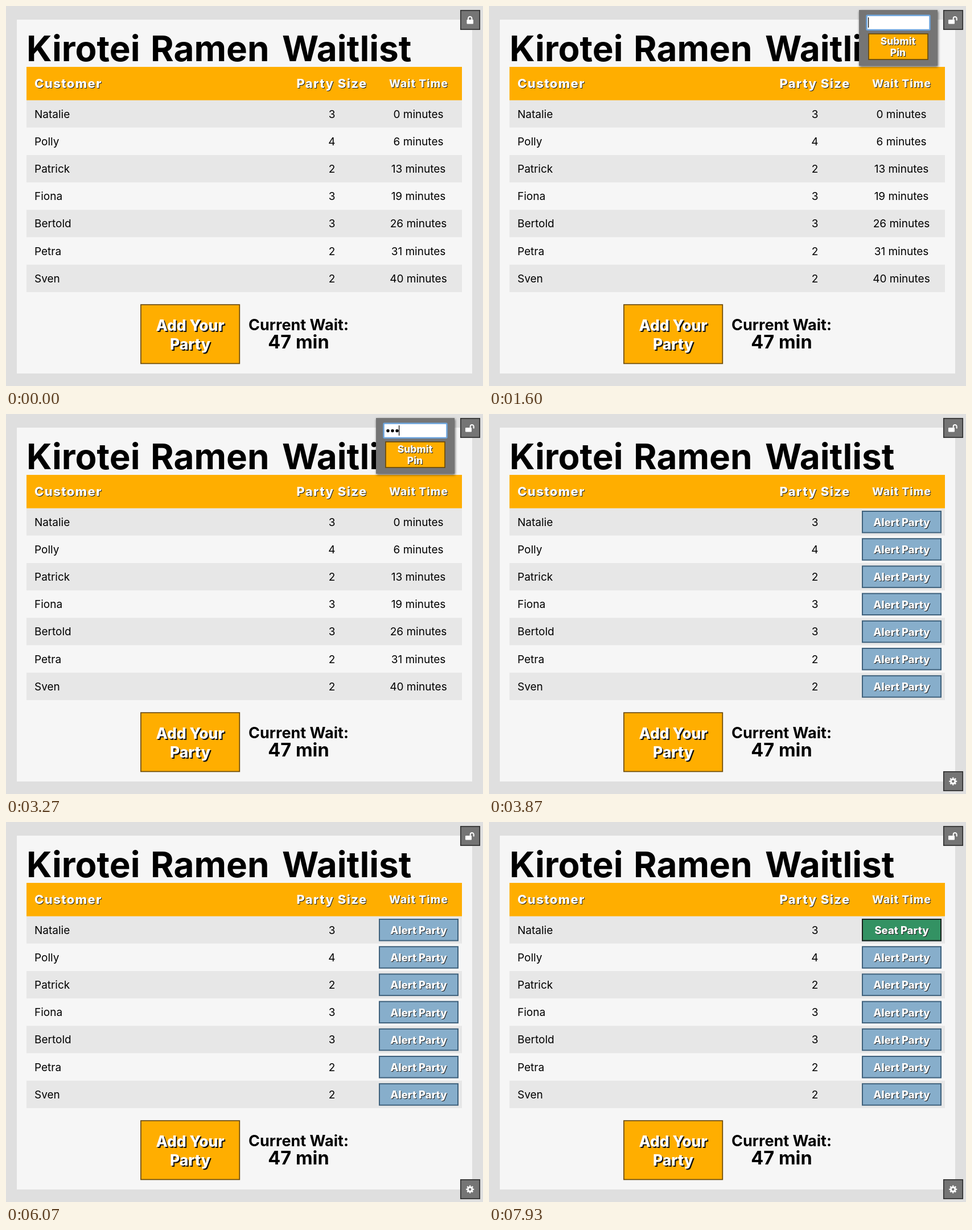
Recreate the animation shown at these times as an HTML page. Size 838 by 668 pixels, loop 8 s.

```html
<!DOCTYPE html>
<html lang="en">
<head>
<meta charset="utf-8">
<title>Waitlist</title>
<style>
  html, body { margin: 0; width: 100%; height: 100%; overflow: hidden; background: #dfdfdf; }
  svg { display: block; width: 838px; height: 668px; }
  text { font: 400 19px Inter, "Open Sans", sans-serif; font-optical-sizing: none; fill: #000; }
  .mid { text-anchor: middle; }
  .title { font-size: 62px; font-weight: 700; }
  .head { font-size: 22px; font-weight: 800; letter-spacing: 1.4px; fill: #fff; filter: drop-shadow(1px 1px 0 #222); }
  .head.small { font-size: 19px; letter-spacing: 1.1px; }
  .label { font-size: 18.5px; font-weight: 800; fill: #fff; filter: drop-shadow(1px 1px 0 #222); }
  .add { font-size: 26.5px; filter: drop-shadow(2px 2px 0 #111); }
  .submit { font-size: 17.5px; }
  .wait { font-size: 27px; font-weight: 700; }
  .wait.big { font-size: 32.5px; }

  .orange { fill: #ffae00; stroke: #6b4a08; stroke-width: 1.7; }
  .alert { fill: #87aecb; stroke: #3f617c; stroke-width: 2; }
  .seat { fill: #339263; stroke: #17231c; stroke-width: 2; }
  .tool { fill: #757575; stroke: #303030; stroke-width: 1.7; }
  .line { fill: none; stroke: #fff; }
  .white { fill: #fff; }

  .locked, .open, .pin, .staff, .seated { animation: 8s step-end infinite; }
  .locked { animation-name: locked; }
  .open { animation-name: open; }
  .pin { animation-name: pin; }
  .staff { animation-name: staff; }
  .seated { animation-name: seated; }
  .dots { animation: typing 8s step-end infinite; }
  .caret { animation: caret 8s step-end infinite, blink 1s .25s step-end infinite; }

  @keyframes locked { 0% { visibility: visible } 15.5% { visibility: hidden } }
  @keyframes open { 0% { visibility: hidden } 15.5% { visibility: visible } }
  @keyframes pin { 0%, 46.25% { visibility: hidden } 15.5% { visibility: visible } }
  @keyframes staff { 0% { visibility: hidden } 46.25% { visibility: visible } }
  @keyframes seated { 0% { visibility: hidden } 81.25% { visibility: visible } }
  @keyframes typing {
    0% { clip-path: inset(0 100% 0 0) }
    33.75% { clip-path: inset(0 75% 0 0) }
    36.25% { clip-path: inset(0 50% 0 0) }
    38.75% { clip-path: inset(0 25% 0 0) }
    41.25% { clip-path: inset(0) }
  }
  @keyframes caret {
    0% { transform: none }
    33.75% { transform: translateX(8px) }
    36.25% { transform: translateX(16px) }
    38.75% { transform: translateX(24px) }
    41.25% { transform: translateX(32px) }
  }
  @keyframes blink { 0% { opacity: 1 } 50% { opacity: 0 } }
</style>
</head>
<body>
<svg viewBox="0 0 838 668">
  <rect width="838" height="668" fill="#dfdfdf"/>
  <rect x="19" y="24" width="800" height="622" fill="#f6f6f6"/>

  <text class="title" y="97"><tspan x="36">Kirotei</tspan> <tspan x="254">Ramen</tspan> <tspan x="485">Waitlist</tspan></text>

  <g id="rows"></g>
  <rect x="36" y="107" width="765" height="58.7" fill="#ffae00"/>
  <text class="head" x="50" y="144">Customer</text>
  <text class="head mid" x="572.5" y="144">Party Size</text>
  <text class="head small mid" x="725" y="143">Wait Time</text>

  <rect class="orange" x="236.9" y="525.1" width="173.4" height="103.4"/>
  <text class="label add mid" x="323.5" y="571">Add Your</text>
  <text class="label add mid" x="323.5" y="604">Party</text>
  <text class="wait mid" x="514" y="570">Current Wait:</text>
  <text class="wait big mid" x="514" y="602">47 min</text>

  <g class="staff" id="buttons"></g>
  <g class="seated">
    <rect class="seat" x="656" y="171" width="138" height="37.5"/>
    <text class="label mid" x="725" y="197">Seat Party</text>
  </g>

  <rect class="tool" x="798.8" y="7.8" width="33.4" height="33.4"/>
  <g class="locked">
    <rect class="white" x="809.5" y="24" width="11.5" height="7.5" rx="1"/>
    <path class="line" stroke-width="2" d="M812 25v-3a3.2 3.2 0 0 1 6.4 0v3"/>
  </g>
  <g class="open">
    <rect class="white" x="807" y="24" width="11" height="7.5" rx="1"/>
    <path class="line" stroke-width="2" d="M815.7 25v-3a3 3 0 0 1 6 0v3.5"/>
  </g>

  <g class="staff">
    <rect class="tool" x="798.8" y="628.8" width="33.4" height="33.4"/>
    <circle class="line" cx="815.2" cy="645.7" r="3.8" stroke-width="3"/>
    <circle class="line" cx="815.2" cy="645.7" r="5.9" stroke-width="2.2" pathLength="16" stroke-dasharray="1" stroke-dashoffset=".5"/>
  </g>

  <g class="pin">
    <rect x="650" y="7" width="138" height="98" fill="#757575" style="filter: drop-shadow(1px 2px 2px #0009)"/>
    <rect x="663.5" y="16.5" width="111" height="25.5" rx="1.5" fill="#fff" stroke="#6da4dc" stroke-width="2.5"/>
    <g class="dots" fill="#000">
      <rect x="667" y="20" width="32" height="18" fill="none"/>
      <circle cx="671" cy="29.5" r="2.7"/>
      <circle cx="679" cy="29.5" r="2.7"/>
      <circle cx="687" cy="29.5" r="2.7"/>
      <circle cx="695" cy="29.5" r="2.7"/>
    </g>
    <rect class="caret" x="666" y="20" width="1.2" height="18"/>
    <rect class="orange" x="667" y="49" width="104" height="45"/>
    <text class="label submit mid" x="718.5" y="68">Submit</text>
    <text class="label submit mid" x="718.5" y="88">Pin</text>
  </g>
</svg>
<script>
  const parties = [
    ["Natalie", 3, 0], ["Polly", 4, 6], ["Patrick", 2, 13], ["Fiona", 3, 19],
    ["Bertold", 3, 26], ["Petra", 2, 31], ["Sven", 2, 40]
  ];
  const rowTop = 165.6, rowHeight = 48.2;

  const fill = (id, draw) => {
    document.getElementById(id).innerHTML =
      parties.map((party, i) => draw(rowTop + i * rowHeight, i, ...party)).join("");
  };

  fill("rows", (y, i, name, size, minutes) => `
    <rect x="36" y="${y}" width="765" height="${rowHeight}" fill="${i % 2 ? "#f6f6f6" : "#e7e7e7"}"/>
    <text x="50" y="${y + 31}">${name}</text>
    <text class="mid" x="572.5" y="${y + 31}">${size}</text>
    <text class="mid" x="724.5" y="${y + 31}">${minutes} minutes</text>`);

  fill("buttons", y => `
    <rect class="alert" x="656" y="${y + 5.4}" width="138" height="37.5"/>
    <text class="label mid" x="725" y="${y + 31.4}">Alert Party</text>`);
</script>
</body>
</html>
```
